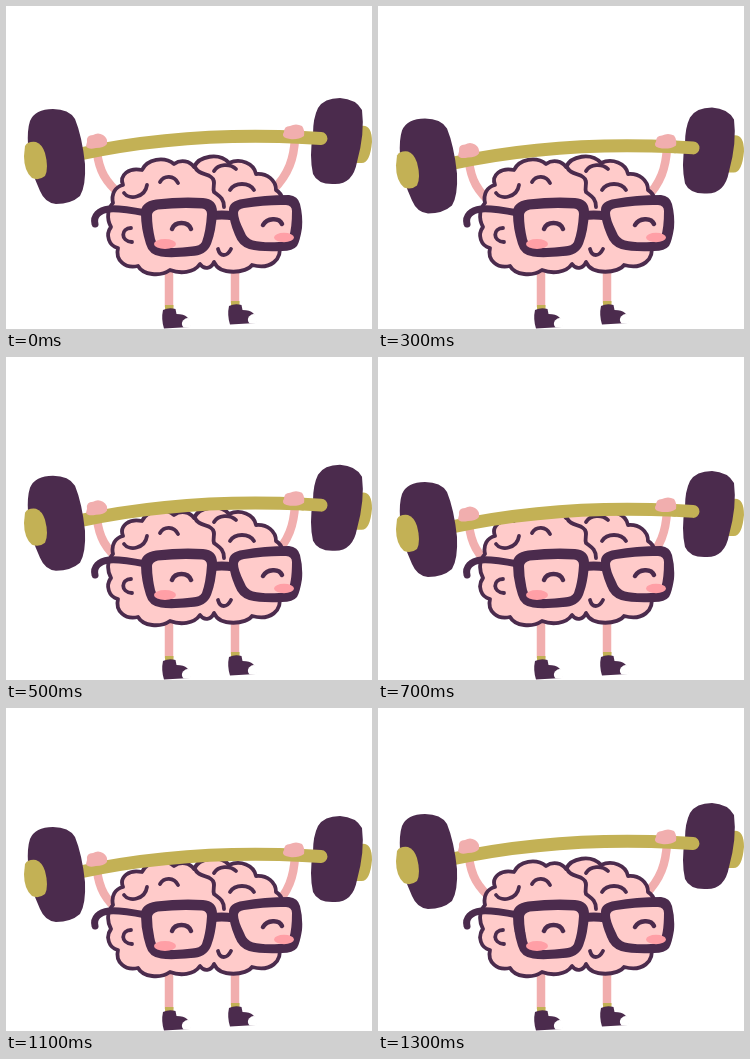
These frames come from a looping animation (366x323 px, 1.4 s). An HTML page:

```html
<!DOCTYPE html>
<html lang="en">
<head>
<meta charset="utf-8">
<title>Brain lifting a barbell</title>
<style>
  html, body { margin: 0; width: 100%; height: 100%; overflow: hidden; background: #fff; }
  svg { display: block; width: 366px; height: 323px; }
  .ink { fill: none; stroke: #4b2b4d; stroke-width: 3.8; stroke-linecap: round; stroke-linejoin: round; }
  .dark { fill: #4b2b4d; }
  .pink { fill: #ffcbca; }
  .gold { fill: #c3b155; }
  .skin { fill: #f1aeae; }
  .limb { fill: none; stroke: #f1aeae; stroke-width: 8.5; }
  .blush { fill: #ff9fa6; }
</style>
</head>
<body>
<svg viewBox="0 0 366 323">
  <defs>
    <g id="leg">
      <path class="limb" d="M163 260V301"/>
      <path class="gold" d="M159 299H167.500V304H159Z"/>
      <path class="dark" d="M157 304Q163 301 169.500 303L170.500 308Q178 308 181 311Q185 315 184 321L158 322.500Q155 313 157 304Z"/>
      <path fill="#fff" d="M177 314.500Q182 310 184.500 314Q186 318 184 321.500L177.500 321.500Q174.500 318 177 314.500Z"/>
    </g>
  </defs>

  <use href="#leg"/>
  <use href="#leg" x="66" y="-4"/>

  <g class="lift">
    <path class="limb" d="M91 146C93 164 99 176 116 190"/>
    <path class="limb" d="M289 132C288 152 283 168 267 184"/>
  </g>

  <!-- brain -->
  <path class="ink" style="fill:#ffcbca" d="M107 197C105 188 109 181 117 179C113 169 123 161 136 164C141 153 158 150 168 158C175 153 184 155 188 161C193 150 213 146 223 157C234 152 248 157 250 168C261 167 270 174 270 184C277 188 279 198 276 208L273 238C277 254 264 264 246 259C241 267 214 270 208 256C205 263 198 264 194 258C188 267 174 268 164 264C154 271 137 269 132 260C119 263 109 254 112 242C103 240 99 229 105 221C100 212 102 202 107 197Z"/>
  <g class="ink">
    <path d="M189 161C192 169 201 167 205 171C211 175 206 181 208 186C213 190 218 192 218 201"/>
    <path d="M118 187C123 194 139 192 141 179"/>
    <path d="M154 176C158 169 168 169 172 177"/>
    <path d="M208 165C212 158 224 157 230 163"/>
    <path d="M224 184C229 176 243 176 248 184"/>
    <path d="M125 222C115 222 114 235 126 236"/>
  </g>

  <!-- glasses and face -->
  <path class="ink" style="stroke-width:7" d="M140 207C124 204 112 202 103 203C93 204 87 210 89 218"/>
  <path class="ink" style="stroke-width:9" d="M205 210Q215 208 228 210"/>
  <path class="dark" d="M135 208Q134 196 150 193.500Q175 190.500 197 192Q211 193 211 206Q210 225 205 238Q200 250 185 250Q165 252 155 250.500Q143 249 140 238Q135 222 135 208Z"/>
  <path class="pink" d="M146 209Q146 205 152 203.500Q175 201 196 202.500Q201 203 201 208Q200 225 196 236Q194 240 186 240.500Q168 243 157 241Q151 240 149 233Q146 220 146 209Z"/>
  <path class="dark" d="M223 204Q223 195 237 193Q258 189 283 189Q292 190 294 198Q297 210 296 222Q294 235 291 240Q287 245 276 245Q255 246 243 243Q233 240 229 229Q223 215 223 204Z"/>
  <path class="pink" d="M232 207Q232 203 238 202Q260 198.500 280 199Q286 199.500 286 205Q286 222 283 231Q281 236 273 236Q257 237 247 234.500Q241 233 238 225Q232 213 232 207Z"/>
  <ellipse class="blush" cx="159" cy="238" rx="11" ry="5"/>
  <ellipse class="blush" cx="278" cy="231.500" rx="10" ry="4.700"/>
  <g class="ink">
    <path style="stroke-width:4.500" d="M166 223C169 215 182 215 185 223"/>
    <path style="stroke-width:4.500" d="M257 219C261 212 273 211 276 218"/>
    <path d="M212 243C214 251 221 251 225 243"/>
  </g>

  <!-- barbell -->
  <g class="lift">
    <path class="gold" d="M346 120H355Q366 118 366 136Q364 158 355 157H346Z"/>
    <path class="dark" d="M312 102Q318 92 334 92Q350 93 356 104Q359 127 351 156Q347 178 329 178Q312 179 307 168Q303 150 307 128Q307 112 312 102Z"/>
    <path fill="none" stroke="#c3b155" stroke-width="13" d="M74 148C130 136 205 127 298 131.500"/>
    <path fill="none" stroke="#c3b155" stroke-width="13" stroke-linecap="round" d="M297 131.500L315 132.500"/>
    <path class="dark" d="M24 115Q29 103 47 103Q63 103 69 113Q76 130 79 158Q80 180 74 190Q65 198 50 198Q39 197 34 185Q24 164 22 140Q21 124 24 115Z"/>
    <path class="gold" d="M19 140Q22 135 30 136Q36 138 39 147Q43 162 39 170Q33 175 26 172Q18 165 18 150Z"/>
    <path class="skin" d="M81 136Q80 129 87 129Q92 126 97 129Q102 132 101 138Q98 142 90 142Q82 144 80 140Z"/>
    <path class="skin" d="M278 126Q278 120 284 120Q290 117 296 120Q299 124 298 130Q292 134 284 133Q276 132 277 128Z"/>
  </g>
</svg>
<script>
  const LOOP = 1400, STEP = 100;
  // [time in ms, how far the barbell has sunk in px]
  const keys = [[0, 0], [800, 25], [1100, 16], [1300, 3], [1400, 0]];
  const moving = document.querySelectorAll('.lift');

  function sink(t) {
    const i = keys.findIndex(k => k[0] > t);
    const [t0, y0] = keys[i - 1], [t1, y1] = keys[i];
    return y0 + (y1 - y0) * (t - t0) / (t1 - t0);
  }

  function draw(now) {
    const t = Math.floor(now % LOOP / STEP) * STEP;
    const y = sink(t).toFixed(2);
    moving.forEach(g => g.setAttribute('transform', `translate(0 ${y})`));
    requestAnimationFrame(draw);
  }
  draw(0);
</script>
</body>
</html>
```
